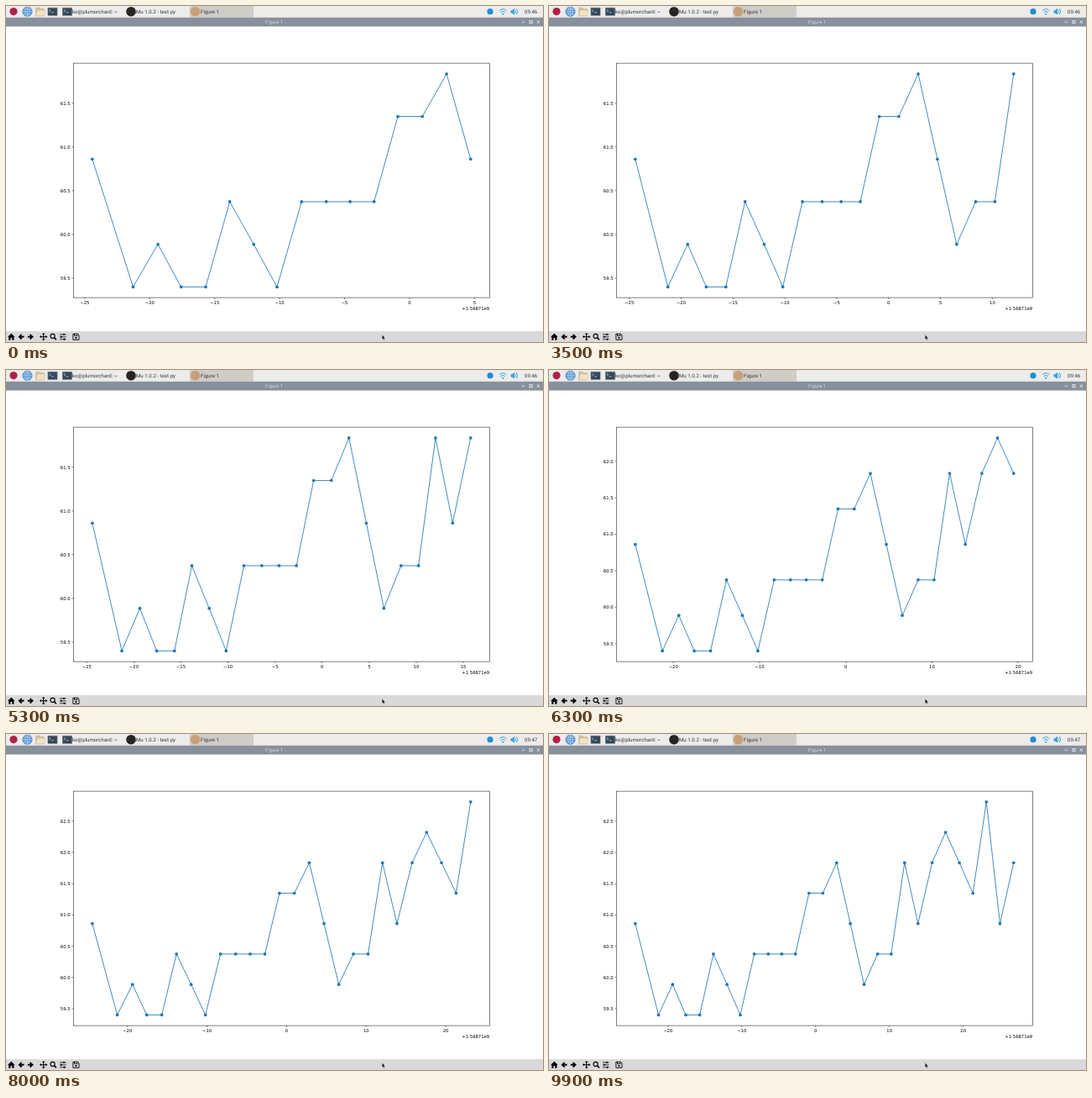
Animation, 640 px wide and 400 px high, one loop 10000 ms. Source, as an HTML page:

```html
<!DOCTYPE html>
<html lang="en">
<head>
<meta charset="utf-8">
<title>Live temperature plot</title>
<style>
html, body { margin: 0; width: 100%; height: 100%; overflow: hidden; background: #fff; }
svg { display: block; width: 640px; height: 400px; text-rendering: geometricPrecision; }
.ui { font: 6.15px Roboto, sans-serif; fill: #3a3a3a; }
.axis { font: 5.29px "DejaVu Sans", sans-serif; fill: #000; }
.frame { fill: none; stroke: #000; stroke-width: .5; }
.series { fill: none; stroke: #1f77b4; stroke-width: .85; stroke-linejoin: round; }
.dots { fill: #1f77b4; }
.end { text-anchor: end; }
.mid { text-anchor: middle; }
.line { fill: none; stroke: #000; stroke-width: 1.1; }
</style>
</head>
<body>
<svg viewBox="0 0 640 400">
  <defs>
    <g id="terminal">
      <rect x="-6" y="-5" width="12" height="10" rx=".6" fill="#8b959e"/>
      <rect x="-5.4" y="-4.2" width="10.8" height="8.6" fill="#34495a"/>
      <path d="M-4-2.5l1.8 1.4L-4 .3M-1.3 1H1.5" fill="none" stroke="#d5dde3" stroke-width=".7"/>
    </g>
    <path id="arrow" d="M-3.6 0L.1-3.4L1.3-2.2L0-1H3.5V1H0L1.3 2.2L.1 3.4Z"/>
  </defs>

  <!-- desktop panel -->
  <rect width="640" height="13.7" fill="#edeceb"/>
  <rect x="219" width="76" height="13.7" fill="#d0cdc9"/>
  <circle cx="9" cy="6.6" r="4.6" fill="#b51f45"/>
  <g fill="none" stroke="#c4dcf3" stroke-width=".6">
    <circle cx="25.5" cy="6.7" r="5.7" fill="#5a97d3" stroke="#3e7abd"/>
    <ellipse cx="25.5" cy="6.7" rx="2.5" ry="5.5"/>
    <path d="M20 6.7H31M21 3.8H30M21 9.6H30M25.5 1.2V12.2"/>
  </g>
  <path d="M35.5 2H40L41 3.3H45.5V11.7H35.5Z" fill="#d8c49b" stroke="#b9a77f" stroke-width=".4"/>
  <path d="M37.5 5H47L45.5 11.7H35.5Z" fill="#f0e3c5" stroke="#c3b28c" stroke-width=".4"/>
  <use href="#terminal" x="55.5" y="6.7"/>
  <use href="#terminal" x="73" y="6.7"/>
  <circle cx="149" cy="6.7" r="5.8" fill="#2a2323"/>
  <circle cx="225.5" cy="6.7" r="5.8" fill="#c7a078"/>
  <g class="ui">
    <text x="79" y="8.9">ko@plumorchard: ~</text>
    <text x="155" y="8.9">Mu 1.0.2 - test.py</text>
    <text x="232" y="8.9">Figure 1</text>
    <text id="clock" class="end" x="633.3" y="8.9"></text>
  </g>
  <circle cx="577" cy="6.7" r="3.6" fill="#218fd0"/>
  <g fill="none" stroke="#35a3dc" stroke-width="1">
    <path d="M588 5.5Q592.2 1.8 596.4 5.5M589.5 7.5Q592.2 5.1 594.9 7.5"/>
    <circle cx="592.2" cy="9.6" r=".7" fill="#35a3dc"/>
    <path d="M606.7 4.7Q608.2 6.7 606.7 8.8M608.4 3.2Q611 6.7 608.4 10.2"/>
    <path d="M602 5.5H603.4L605.3 3.4V10L603.4 8H602Z" fill="#35a3dc"/>
  </g>

  <!-- window title -->
  <rect y="13.7" width="640" height="10.7" fill="#87919b"/>
  <text class="ui mid" x="319.5" y="21.2" style="font-size:5.9px;fill:#d0d5da">Figure 1</text>
  <g fill="none" stroke="#edf0f2" stroke-width=".9">
    <path d="M614.6 18.3L616.4 20L618.2 18.3M632.7 17.4L636 20.7M636 17.4L632.7 20.7"/>
    <rect x="624" y="17.6" width="3.1" height="3.1"/>
  </g>

  <!-- plot -->
  <rect class="frame" x="80.3" y="68.1" width="496" height="279"/>
  <path id="ticks" class="frame"/>
  <g id="labels" class="axis"></g>
  <text class="axis end" x="576.2" y="361.8">+1.56871e9</text>
  <polyline id="series" class="series"/>
  <g id="dots" class="dots"></g>

  <!-- toolbar -->
  <rect y="387.2" width="640" height="12.8" fill="#d9d9d9"/>
  <path d="M6.3 389.8L2 394H3.2V397.7H5.4V395H7.2V397.7H9.4V394H10.6Z"/>
  <use href="#arrow" x="18" y="393.8"/>
  <use href="#arrow" transform="translate(29.3 393.8) scale(-1 1)"/>
  <path class="line" d="M41 393.8H48.4M44.7 390.1V397.5"/>
  <path d="M40 393.8l2-1.8v3.6zM49.4 393.8l-2-1.8v3.6zM44.7 389.1l-1.8 2h3.6zM44.7 398.5l-1.8-2h3.6z"/>
  <circle class="line" cx="55.6" cy="393" r="2.6"/>
  <path class="line" d="M57.5 394.9L60 397.4" style="stroke-width:1.5"/>
  <path class="line" d="M64 391H71.6M64 393.9H71.6M64 396.8H71.6" style="stroke-width:.8"/>
  <path class="line" d="M69 389.9V392.1M66 392.8V395M69.5 395.7V397.9" style="stroke-width:1.5"/>
  <path class="line" d="M79.9 390.3H85.6L87 391.7V397.4H79.9ZM81.5 390.3V392.6H85V390.3" style="stroke-width:.9"/>
  <circle cx="83.4" cy="395.2" r="1.1"/>
  <path d="M448.3 391.6V397L449.5 395.9L450.3 397.8L451.2 397.4L450.4 395.6H452Z" stroke="#fff" stroke-width=".3"/>
</svg>
<script>
const LOOP = 10000, MINUTE_CHANGE = 6500, FIRST_COUNT = 16;
const seconds = [-24.42, -21.28, -19.37, -17.58, -15.69, -13.84, -12, -10.2, -8.31, -6.41,
  -4.58, -2.73, -0.9, 0.98, 2.85, 4.7, 6.56, 8.39, 10.24, 12.05, 13.87, 15.78, 17.6,
  19.47, 21.3, 23.13, 24.97, 26.82];
// The sensor reports in steps of 0.487 degrees.
const degrees = [...'3010021022224453122535654735'].map(n => 59.4 + n * 0.487);
const arrivals = [100, 800, 1900, 2600, 3600, 4400, 5400, 6200, 7100, 7900, 8800, 9600];
const box = { left: 80.3, right: 576.3, top: 68.1, bottom: 347.1 };
const TICK = 1.85;
const byId = id => document.getElementById(id);

// Data limits with a 5% margin on each side, mapped to pixels from..to.
function makeAxis(values, from, to) {
  const low = Math.min(...values), high = Math.max(...values);
  const margin = (high - low) * 0.05;
  const min = low - margin, max = high + margin;
  const step = [0.5, 1, 2, 2.5, 5, 10].find(s => s >= (max - min) / 9);
  const ticks = [];
  for (let v = Math.ceil(min / step) * step; v <= max; v += step) ticks.push(v);
  return { ticks, map: v => from + (v - min) / (max - min) * (to - from) };
}

function label(text, x, y, anchor) {
  return `<text class="${anchor}" x="${x}" y="${y}">${text.replace('-', '−')}</text>`;
}

function drawPlot(count) {
  const xs = seconds.slice(0, count), ys = degrees.slice(0, count);
  const xAxis = makeAxis(xs, box.left, box.right);
  const yAxis = makeAxis(ys, box.bottom, box.top);
  let marks = '', labels = '';
  for (const v of xAxis.ticks) {
    const x = xAxis.map(v);
    marks += `M${x} ${box.bottom}v${TICK}`;
    labels += label(String(v), x, 354.8, 'mid');
  }
  for (const v of yAxis.ticks) {
    const y = yAxis.map(v);
    marks += `M${box.left} ${y}h${-TICK}`;
    labels += label(v.toFixed(1), 76.6, y + 1.95, 'end');
  }
  const points = xs.map((x, i) => [xAxis.map(x), yAxis.map(ys[i])]);
  byId('ticks').setAttribute('d', marks);
  byId('labels').innerHTML = labels;
  byId('series').setAttribute('points', points.join(' '));
  byId('dots').innerHTML = points.map(([x, y]) => `<circle cx="${x}" cy="${y}" r="1.85"/>`).join('');
}

let shownCount = 0;
function render(now) {
  const time = now % LOOP;
  const count = FIRST_COUNT + arrivals.filter(t => t <= time).length;
  if (count !== shownCount) drawPlot(shownCount = count);
  byId('clock').textContent = time < MINUTE_CHANGE ? '09:46' : '09:47';
}

const start = performance.now();
function tick() {
  render(performance.now() - start);
  requestAnimationFrame(tick);
}
tick();
</script>
</body>
</html>
```
